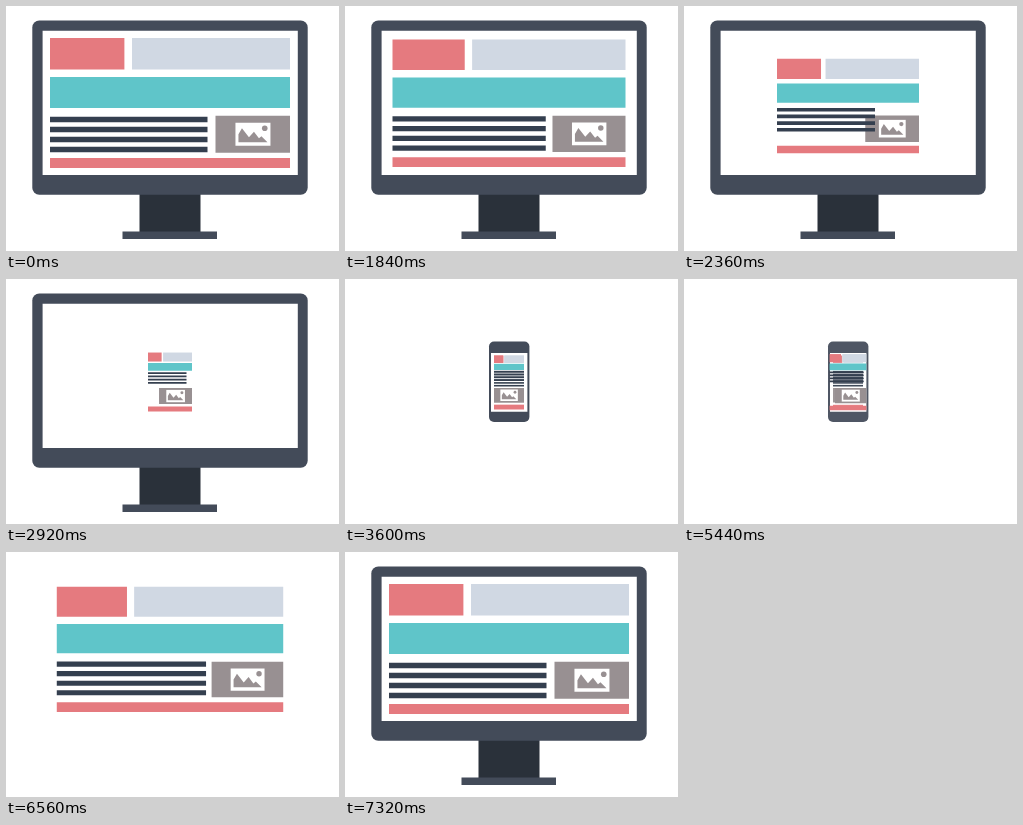
An HTML page with a canvas for the animation above (7.68 s loop, 333x245 px).

```html
<!DOCTYPE html>
<html lang="en">
<head>
<meta charset="utf-8">
<title>Responsive layout</title>
<style>
  html, body { margin: 0; width: 100%; height: 100%; overflow: hidden; background: #fff; }
  canvas { display: block; width: 333px; height: 245px; }
</style>
</head>
<body>
<canvas id="stage"></canvas>
<script>
const WIDTH = 333, HEIGHT = 245;
const LOOP = 7680, STEP = 40, SHRINK_AT = 1840, GROW_AT = 5440;
const FRAME = '#434b59', STAND = '#2a313a', PINK = '#e57a7f', BLUE = '#d0d8e3',
      TEAL = '#5fc5c9', INK = '#343f4f', GREY = '#989092', WHITE = '#fff';

const wide = {
  left: 44, width: 240, top: 32, header: 31.4, banner: 31, gap: 7.6,
  textTop: 110.8, textWidth: 157.5, textStep: 10, line: 5.4,
  mediaLeft: 209.5, mediaTop: 109.8, mediaHeight: 37, icon: 1,
  footerTop: 152, footer: 10
};
const narrow = {
  left: 149, width: 30, top: 76.5, header: 7.4, banner: 6, gap: 1,
  textTop: 91.9, textWidth: 30, textStep: 2.8, line: 1.6,
  mediaLeft: 149, mediaTop: 109, mediaHeight: 14.5, icon: 0.5,
  footerTop: 125.8, footer: 4.5
};

const ratio = window.devicePixelRatio || 1;
const stage = makePen(document.getElementById('stage'));
const layer = makePen(document.createElement('canvas'));

function makePen(canvas) {
  canvas.width = WIDTH * ratio;
  canvas.height = HEIGHT * ratio;
  const pen = canvas.getContext('2d');
  pen.scale(ratio, ratio);
  return pen;
}

function box(pen, color, x, y, width, height, radius = 0) {
  pen.fillStyle = color;
  pen.beginPath();
  pen.roundRect(x, y, width, height, radius);
  pen.fill();
}

function drawPicture(pen, x, y, scale) {
  pen.save();
  pen.translate(x, y);
  pen.scale(scale, scale);
  box(pen, WHITE, -17.3, -11.5, 35, 23);
  pen.fillStyle = GREY;
  pen.fill(new Path2D('M-14.3 8V0l3.5-6 7 9 5-5.5 5 6.5 2.5-2 6 6z'));
  pen.beginPath();
  pen.arc(12, -6, 2.8, 0, 2 * Math.PI);
  pen.fill();
  pen.restore();
}

function drawPage(pen, page, lines) {
  const { left, width, top, header, gap } = page;
  const column = width * 0.31;
  const mediaWidth = left + width - page.mediaLeft;
  box(pen, PINK, left, top, column, header);
  box(pen, BLUE, left + column + gap, top, width - column - gap, header);
  box(pen, TEAL, left, top + header + gap, width, page.banner);
  box(pen, GREY, page.mediaLeft, page.mediaTop, mediaWidth, page.mediaHeight);
  drawPicture(pen, page.mediaLeft + mediaWidth / 2, page.mediaTop + page.mediaHeight / 2, page.icon);
  box(pen, PINK, left, page.footerTop, width, page.footer);
  for (let i = 0; i < lines; i++) {
    box(pen, INK, left, page.textTop + i * page.textStep, page.textWidth, page.line);
  }
}

function drawMonitor(pen) {
  box(pen, STAND, 133.5, 188, 61, 38);
  box(pen, FRAME, 116.5, 225.5, 94.5, 7.5);
  box(pen, FRAME, 26.3, 14.5, 275.4, 174.2, 7);
  box(pen, WHITE, 36.6, 24.7, 255.2, 144.3);
}

// The phone carries its own page with two more lines of text.
function drawPhone(pen) {
  box(pen, FRAME, 144, 62.6, 40.4, 80.4, 5);
  box(pen, WHITE, 146, 74, 36.4, 58.7);
  drawPage(pen, narrow, 6);
}

// Drawn on a layer first, so that a device fades as one piece.
function drawFaded(draw, alpha) {
  layer.clearRect(0, 0, WIDTH, HEIGHT);
  draw(layer);
  stage.globalAlpha = alpha;
  stage.drawImage(layer.canvas, 0, 0, WIDTH, HEIGHT);
  stage.globalAlpha = 1;
}

const progress = (n, from, to) => Math.min(1, Math.max(0, (n - from) / (to - from)));

function mixPages(p) {
  const page = {};
  for (const key in wide) page[key] = wide[key] + (narrow[key] - wide[key]) * p;
  return page;
}

function stateAt(time) {
  const stepsSince = start => Math.floor((time - start) / STEP) + 1;
  if (time < GROW_AT) {
    const n = stepsSince(SHRINK_AT), swap = progress(n, 30, 45);
    return { small: progress(n, 0, 30), monitor: 1 - swap, phone: swap };
  }
  const n = stepsSince(GROW_AT);
  return {
    small: 1 - progress(n, 0, 31),
    monitor: progress(n, 31, 48),
    phone: 1 - progress(n, 0, 15)
  };
}

function render(time) {
  const { small, monitor, phone } = stateAt(time);
  box(stage, WHITE, 0, 0, WIDTH, HEIGHT);
  drawFaded(drawMonitor, monitor);
  drawFaded(drawPhone, phone);
  drawPage(stage, mixPages(small), 4);
}

const start = performance.now();
function tick() {
  render((performance.now() - start) % LOOP);
  requestAnimationFrame(tick);
}
tick();
</script>
</body>
</html>
```
